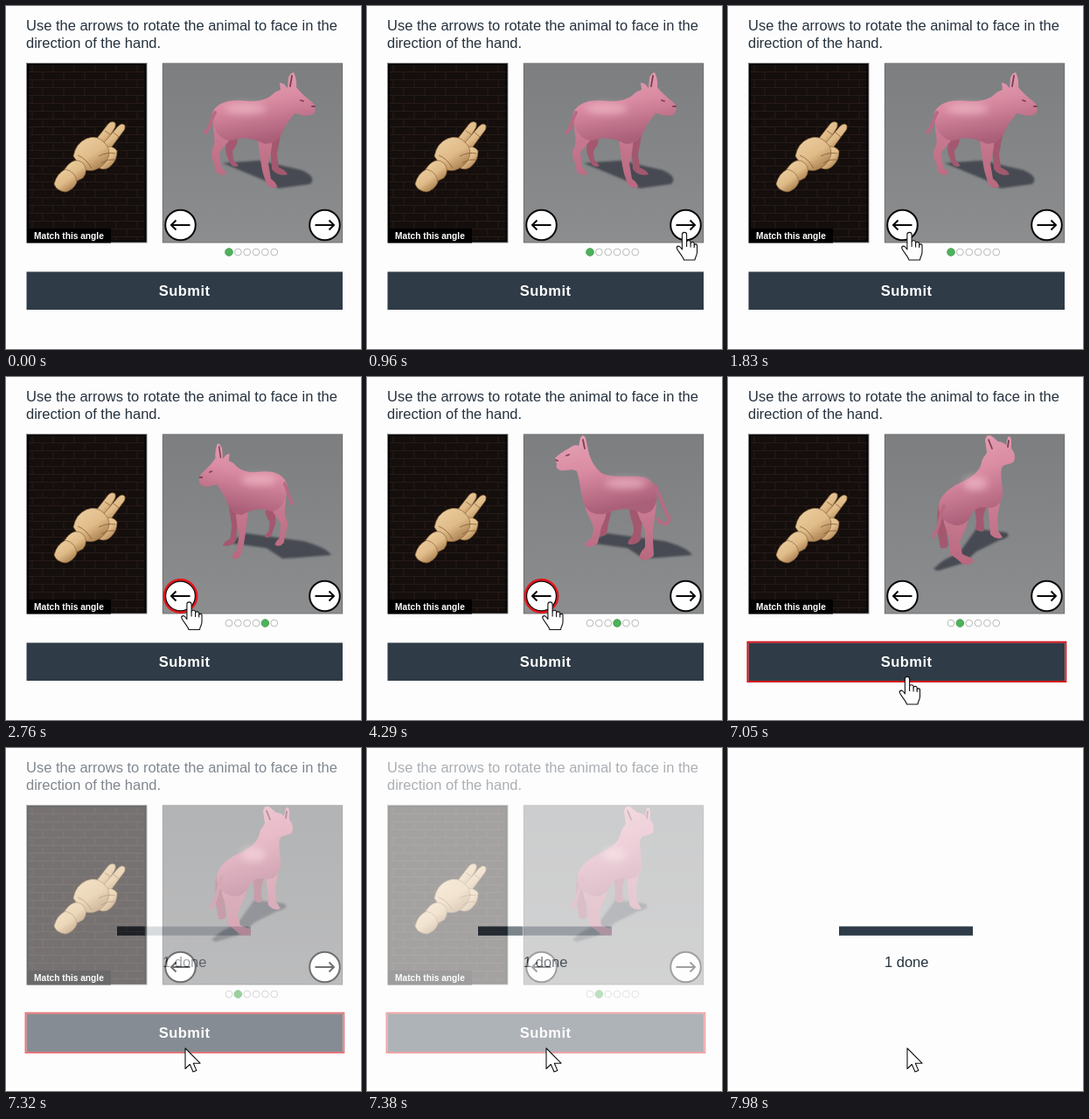
An HTML page that plays this animation: 406x393 px, repeating every 8 s.

```html
<!DOCTYPE html>
<html lang="en">
<head>
<meta charset="utf-8">
<title>Rotate the animal</title>
<style>
  html, body { margin: 0; width: 100%; height: 100%; overflow: hidden; background: #fdfdfd; }
  svg { display: block; width: 406px; height: 393px; font-family: "Liberation Sans", Arial, sans-serif; }
</style>
</head>
<body>
<svg viewBox="0 0 406 393" xmlns="http://www.w3.org/2000/svg">
  <defs>
    <linearGradient id="floor" x2="0" y2="1">
      <stop offset="0" stop-color="#7c7e80"/><stop offset="1" stop-color="#8c8d8f"/>
    </linearGradient>
    <linearGradient id="skin" x2=".25" y2="1">
      <stop offset="0" stop-color="#e6a4b6"/><stop offset=".5" stop-color="#d98ba2"/><stop offset="1" stop-color="#ab6079"/>
    </linearGradient>
    <linearGradient id="limb" x2="0" y2="1">
      <stop offset="0" stop-color="#cb7f96"/><stop offset="1" stop-color="#b9687f"/>
    </linearGradient>
    <linearGradient id="wood" x2=".7" y2="1">
      <stop offset="0" stop-color="#efd2a4"/><stop offset=".6" stop-color="#dfbb88"/><stop offset="1" stop-color="#a87d4d"/>
    </linearGradient>
    <pattern id="bricks" width="24" height="18" x="24" y="66" patternUnits="userSpaceOnUse">
      <path d="M0 .5H24M0 9.5H24M6 0V9M18 9V18" fill="none" stroke="#271b18"/>
    </pattern>
    <clipPath id="view"><path d="M179.5 66.5H384.5V270.5H179.5Z"/></clipPath>
    <filter id="soft" x="-20%" y="-40%" width="140%" height="180%"><feGaussianBlur stdDeviation="1.3"/></filter>
    <filter id="glow" x="-60%" y="-60%" width="220%" height="220%"><feGaussianBlur stdDeviation="4"/></filter>
    <g id="ball"><circle r="17.3" fill="#fff" stroke="#0a0a0a" stroke-width="2"/></g>
  </defs>
  <rect width="406" height="393" fill="#fdfdfd"/>
  <g font-size="16.5" fill="#26323e">
    <text x="23" y="28">Use the arrows to rotate the animal to face in the</text>
    <text x="23" y="47.5">direction of the hand.</text>
  </g>

  <rect x="24" y="66" width="137" height="205" fill="#140e0c"/>
  <rect x="24" y="66" width="137" height="205" fill="url(#bricks)"/>
  <path d="M159.5 67V270H25V67Z" fill="none" stroke="#050404" stroke-width="2"/>
  <rect x="23.5" y="65.5" width="137.5" height="205.5" fill="none" stroke="#7d7d7d" stroke-width=".9"/>
  <g fill="url(#wood)" stroke="#8a643b" stroke-width=".7" stroke-linejoin="round">
    <path d="M103 153L117 135Q121 131 125 134Q126 138 123 142L112 160Z"/>
    <path d="M110 159L128 138Q133 133 136 137Q137 141 133 145L119 164Z"/>
    <path d="M112 162Q122 159 127 166Q127 176 121 182Q115 189 107 186Z"/>
    <path d="M77 172Q80 157 92 152Q104 147 113 157Q120 164 117 173Q113 184 101 188Q92 190 86 185Z"/>
    <path d="M71 182Q80 173 88 180Q95 188 88 197L78 202L67 187Z"/>
    <path d="M55 204Q58 192 68 187Q80 190 81 202Q77 211 68 213Q58 212 55 204Z"/>
    <path d="M106 172Q116 167 125 169M109 180Q116 175 124 176M113 143L119 147M123 145L129 150M82 171Q92 175 98 186" fill="none" stroke="#77522f"/>
  </g>
  <rect x="24" y="255" width="96" height="16.5" fill="#000"/>
  <text x="32" y="267" font-size="10.2" font-weight="700" fill="#fff">Match this angle</text>

  <rect x="179" y="66" width="206" height="205" fill="url(#floor)"/>
  <g id="dogs" clip-path="url(#view)"></g>
  <rect x="179.3" y="65.8" width="205.4" height="205.2" fill="none" stroke="#6c6c6c" stroke-width=".9"/>
  <g fill="none" stroke="#0a0a0a" stroke-width="2">
    <use href="#ball" x="199.5" y="251"/>
    <use href="#ball" x="364.5" y="251"/>
    <circle id="ring" cx="199.5" cy="251" r="18.7" stroke="#e3151b" stroke-width="2.4"/>
    <path d="M210.5 251H189M194.5 245.5L189 251L194.5 256.5M353.5 251H375M369.5 245.5L375 251L369.5 256.5"/>
  </g>
  <g id="dots"></g>

  <rect x="23.5" y="304.5" width="361.5" height="43.5" fill="#2f3b47"/>
  <rect id="focus" x="22.5" y="303.7" width="363.8" height="45.3" fill="none" stroke="#d3161d" stroke-width="2"/>
  <text x="174.7" y="332" font-size="16.5" font-weight="700" letter-spacing=".5" fill="#fff">Submit</text>

  <g id="cover">
    <rect width="406" height="393" fill="#fdfdfd"/>
    <rect x="127" y="204.5" width="153" height="10.3" fill="#a6adb5"/>
    <rect id="bar" x="127" y="204.5" height="10.3" fill="#2e3b48"/>
    <text x="179" y="250.7" font-size="16.5" fill="#26323e">1 done</text>
  </g>
  <g id="cursor" fill="#fff" stroke="#111" stroke-width="1.1" stroke-linejoin="round">
    <g id="hand">
      <path d="M-2.6 2a2.6 2.6 0 0 1 5.2 0V10.5a2.3 2.3 0 0 1 4.5 0V12a2.1 2.1 0 0 1 4.1 0V14a1.8 1.8 0 0 1 3.3 0V22C14.5 26 12.5 27 12 31H-.5C-1.5 27-6 23-8.5 18C-9.5 15.5-6.5 14-4.5 16.5L-2.6 19Z"/>
      <path d="M2.6 10.5V16M7.1 12V16.5M11.2 14V17" fill="none"/>
    </g>
    <path id="arrow" d="M0 0V23.5L5.3 18.5L9 27L12.8 25.4L9.3 17.2H17Z"/>
  </g>
</svg>
<script>
const LOOP = 8000;
const $ = id => document.getElementById(id);

// Views: shadow, far legs, near legs, body, tail, face detail, soft light
const right = {
  far: 'M252 150C252 158 250 163 252 170L256 180Q260 186 266 183L260 176L259 166C264 160 266 154 264 148ZM300 154L303 172L304 187Q311 196 322 193Q320 188 312 185L310 170L314 148Z',
  near: 'M237 130C236 145 240 152 238 160C234 166 234 172 238 180L240 190Q246 196 252 192Q250 187 246 185L244 168C250 160 258 152 260 146ZM287 148C290 165 291 180 294 192L298 204Q304 211 310 207Q309 202 303 198L300 180C303 168 305 160 304 152Z',
  body: 'M237 120C244 108 262 107 276 109C290 110 300 106 305 101C309 97 312 97 314 96L313 88C318 88 320 92 322 94L323 82Q325 77 329 76Q333 84 332 93C336 98 342 104 350 110C355 114 355 121 351 124C344 128 336 124 330 123C325 130 320 135 317 143C312 154 305 158 296 158C284 152 272 150 262 153C252 157 243 150 238 138C234 130 235 124 237 120Z',
  tail: 'M239 122C234 130 235 138 228 145',
  face: 'M325 92L327 80M337 108L340 109M350 115L353 115',
  light: [274, 118, 24, 6]
};
const away = {
  far: 'M241 146C238 160 240 170 240 180L243 196Q250 197 252 193L250 178L256 160ZM282 148L284 165L283 174Q288 179 293 176L292 160L296 146Z',
  near: 'M246 158C246 172 253 178 253 188L254 203Q262 208 268 214Q277 217 282 210Q276 206 268 203L265 190C268 180 274 172 276 156ZM297 146L299 165L300 180Q306 187 314 184L309 176L308 160L312 140Z',
  body: 'M241 150C240 138 252 128 264 122C278 116 288 108 290 98C291 92 295 90 296 86L294 72Q296 64 302 68L309 74C313 74 316 76 318 78L320 69Q323 66 324 72L324 82C328 86 329 92 327 97C322 101 316 99 313 104C311 112 314 122 314 132C314 144 308 150 298 150C288 148 282 150 277 160C272 170 262 172 254 168C246 164 241 158 241 150Z',
  tail: 'M247 148C241 162 243 172 234 183',
  face: 'M298 72L302 82M321 73L320 80',
  light: [283, 122, 14, 8]
};
const left = {
  far: 'M262 156L266 172L263 180Q270 184 274 180L276 168L280 152ZM300 150C300 162 306 168 305 178L302 184Q296 190 300 192Q310 192 313 186L314 170L318 152Z',
  near: 'M249 148C252 160 259 166 259 176L257 184Q248 190 250 194Q258 196 264 190L268 172C272 164 274 158 274 152ZM308 150C310 162 318 170 318 180L318 195Q309 204 313 209Q324 211 328 204L327 186C326 172 330 160 331 144Z',
  body: 'M215 93C221 87 227 84 232 81Q238 76 242 79L244 70Q247 64 250 70L253 84C255 94 260 103 268 110C282 117 304 112 318 115C328 119 333 130 331 142C329 152 322 158 314 156C302 150 290 150 278 155C266 160 252 157 248 145C244 134 244 120 240 108C234 104 228 108 221 107Q215 105 217 100Z',
  tail: 'M329 124C337 138 339 152 345 160Q347 168 340 168Q335 167 333 163',
  face: 'M247 72L249 82M228 90L231 89M216 95L218 96',
  light: [296, 122, 24, 6]
};
const front = {
  far: 'M268 155L270 184Q275 190 280 186L280 158ZM302 155L303 182Q308 189 313 185L312 150Z',
  near: 'M270 150C273 170 274 185 275 202Q279 210 286 206L286 160ZM292 160L294 203Q300 210 306 205L305 185L311 150Z',
  body: 'M268 120C270 110 276 106 279 100Q274 88 277 78Q284 82 287 92L296 92Q299 82 306 78Q309 90 303 101C308 110 313 122 314 136C316 150 310 162 304 166L276 166C262 160 260 134 268 120Z',
  tail: '',
  face: 'M280 84L284 92M303 84L299 92M285 102L286 103M297 102L296 103M284 112Q291 128 298 112M288 117H294',
  light: [290, 135, 14, 12]
};
const shade = {
  right: 'M248 180L290 177L338 188Q356 196 348 204L312 209L296 200Z',
  away: 'M235 220Q246 208 264 202L284 174L318 178Q326 183 310 187L284 200L270 213L240 222Z',
  left: 'M254 190L274 179L340 188Q366 195 372 204L334 207L316 208L298 196Z'
};
const flip = k => `translate(282) scale(${-k} 1) translate(-282)`;
const views = [
  [right, shade.right],
  [away, shade.away],
  [away, shade.right, flip(.75)],
  [left, shade.left],
  [right, shade.left, flip(.85)],
  [front, shade.right]
];

$('dogs').innerHTML = views.map(([d, shadow, turn = '']) => {
  const [cx, cy, rx, ry] = d.light;
  return `<g><path d="${shadow}" fill="#3c4148" opacity=".85" filter="url(#soft)"/>
    <g transform="${turn}">
      <path d="${d.far}" fill="#a3586f"/>
      <path d="${d.near}" fill="url(#limb)"/>
      <path d="${d.body}" fill="url(#skin)"/>
      <path d="${d.tail}" fill="none" stroke="#b76b82" stroke-width="4" stroke-linecap="round"/>
      <ellipse cx="${cx}" cy="${cy}" rx="${rx}" ry="${ry}" fill="#f6c3d0" opacity=".6" filter="url(#glow)"/>
      <path d="${d.face}" fill="none" stroke="#7f3f55" stroke-width="1.8" stroke-linecap="round"/>
    </g></g>`;
}).join('');
$('dots').innerHTML = views.map((_, i) => `<circle cx="${255 + i * 10.35}" cy="282"/>`).join('');

const dogs = [...$('dogs').children], dots = [...$('dots').children];
const clicks = [2040, 2760, 3600, 4440, 5190];
// time, x, y of the pointer tip
const track = [
  [510, 410, 232], [960, 363, 260], [1350, 363, 260], [1830, 207.5, 260],
  [1950, 207.5, 260], [2040, 209.5, 258.5], [5580, 209.5, 258.5],
  [5880, 212.5, 331], [6240, 205, 344]
];
const clamp = v => Math.min(1, Math.max(0, v));
const ease = v => v * v * (3 - 2 * v);
const show = (el, on) => el.setAttribute('visibility', on ? 'visible' : 'hidden');

function pointer(t) {
  let [, x, y] = track[0];
  for (let i = 1; i < track.length; i++) {
    const [t0] = track[i - 1], [t1, x1, y1] = track[i];
    const k = ease(clamp((t - t0) / (t1 - t0)));
    x += (x1 - x) * k;
    y += (y1 - y) * k;
  }
  return [x, y];
}

function draw(t) {
  const active = (6 - clicks.filter(c => t >= c).length) % 6;
  dogs.forEach((d, i) => show(d, i === active));
  dots.forEach((d, i) => {
    const on = i === active;
    d.setAttribute('r', on ? 4.3 : 3.9);
    d.setAttribute('fill', on ? '#4fb15c' : '#fff');
    d.setAttribute('stroke', on ? '#48a455' : '#b9b9b9');
  });
  show($('ring'), t >= 1950 && t < 7050);
  show($('focus'), t >= 7050);

  const done = t >= 7170;
  $('cover').setAttribute('opacity', clamp((t - 7195) / 300));
  $('bar').setAttribute('width', 153 * (1 - (1 - clamp((t - 7230) / 750)) ** 1.8));

  const [x, y] = pointer(t);
  const onButton = [199.5, 364.5].some(cx => Math.hypot(x - cx, y - 251) < 18.5);
  const onSubmit = y > 304 && y < 348;
  const hand = !done && (onButton || onSubmit);
  show($('cursor'), t >= 510);
  $('cursor').setAttribute('transform', `translate(${x} ${y})`);
  $('hand').style.display = hand ? '' : 'none';
  $('arrow').style.display = hand ? 'none' : '';
}

const start = performance.now();
function tick() {
  draw((performance.now() - start) % LOOP);
  requestAnimationFrame(tick);
}
draw(0);
requestAnimationFrame(tick);
</script>
</body>
</html>
```
